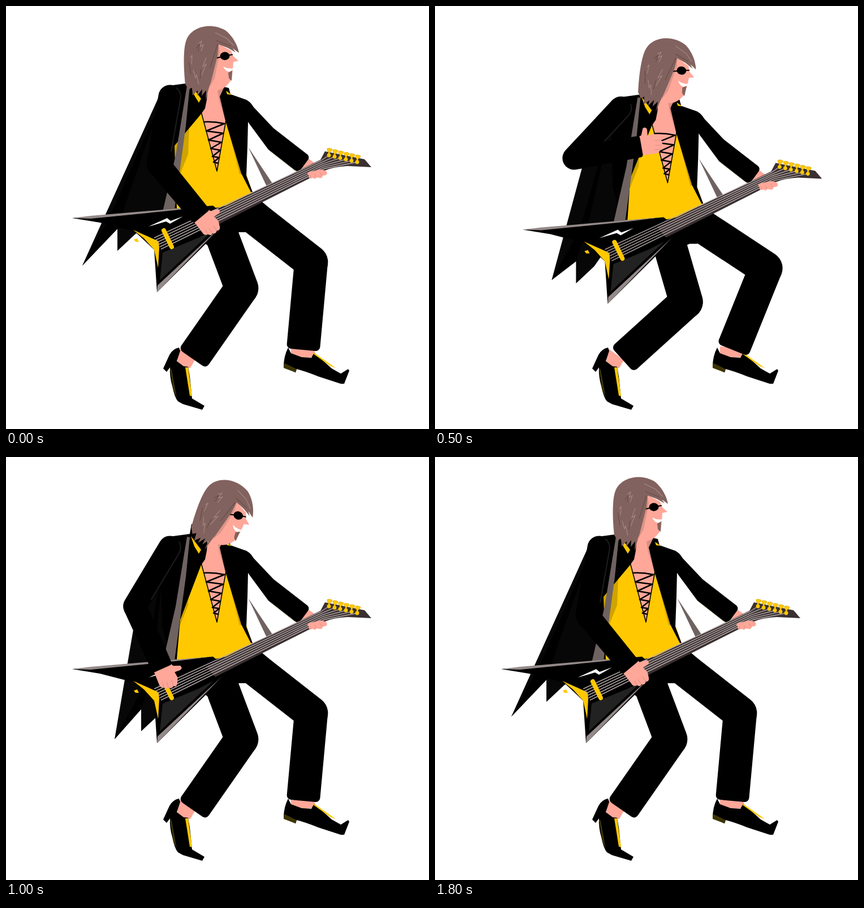
An HTML page that plays this animation: 748x748 px, repeating every 1820 ms.

```html
<!DOCTYPE html>
<html lang="en">
<head>
<meta charset="utf-8">
<title>Guitarist</title>
<style>
  html, body { margin: 0; width: 100%; height: 100%; overflow: hidden; background: #fff; }
  svg { display: block; width: 100vw; height: 100vh; }
  .skin { fill: #ffa799; }
  .gold { fill: #ffc800; }
  .olive { fill: #3c3404; }
  .strap { fill: #6f6361; }
  .bevel { fill: #958a8a; }
  .hair { fill: #82625e; }
  .wood { fill: #3a3031; }
  .line { fill: none; stroke: #000; stroke-linejoin: round; stroke-linecap: round; }
  .string { fill: none; stroke: #b3a7a7; stroke-width: 1.4; }
  .limb { stroke: #000; stroke-linecap: round; }
</style>
</head>
<body>
<svg viewBox="0 0 748 748">
  <g class="body">
    <path id="cape" fill="#070707"/>
    <path id="fold" fill="#000"/>
  </g>

  <g id="feet">
    <path class="skin" d="M304 604L334 626L326 640L316 640L303 630Z"/>
    <path d="M306 604Q295 606 289 617L278 641L284 647L290 639Q289 655 294 672Q298 692 304 699L313 704L347 714L351 707L329 694L325 655L322 638L314 637L302 628L308 610Z"/>
    <path class="gold" d="M317 639L322 639L329 690L325 689Z"/>
    <path class="olive" d="M290 641L293 643L302 693L296 679Z"/>
    <path class="skin" d="M504 602L548 605L543 621L526 622L504 615Z"/>
    <path d="M499 604Q491 619 491 638L512 648L514 642Q530 646 552 655L592 668H598L607 645L605 642L592 650L576 641L545 613L540 622L523 621L504 614Z"/>
    <path class="gold" d="M542 614L546 614L583 640L574 637Z"/>
    <path class="olive" d="M491 631L514 642L512 648L491 640Z"/>
  </g>

  <g class="body"><path d="M300 335H440L465 357L425 400L412 400L358 424L320 400Z"/></g>
  <g id="legs"></g>

  <g class="body">
    <path class="strap" d="M428 249L472 315L461 319Z"/>
    <path class="gold" d="M335 165L298 240L297 362L372 362L436 330L390 195Z"/>
    <path fill="#cfa300" d="M324 214L322 262L306 302L297 318V240Z"/>
    <path fill="#cfa300" d="M389 202L407 255L424 299L413 297Z"/>
    <path class="skin" d="M354 130H388L383 160L388 202L373 290L346 187Z"/>
    <path fill="#d78f83" d="M374 150L389 138L380 160L388 202L377 168Z"/>
    <path class="line" stroke-width="1.6" d="M345 187L373 292L389 202"/>
    <path class="line" stroke-width="2.5" d="M350 205Q368 204 386 208L354 221L384 225L358 237L381 241L362 252L379 255L365 266L377 268L367 276L375 278"/>
    <path id="panel"/>
    <path class="gold" d="M327 140L345 164L341 171L333 158Z"/>
    <path d="M386 143L394 145L397 156L425 166L437 178L428 205L427 247L425 300L436 329L433 329L416 296L388 203L378 160Z"/>
    <path class="gold" d="M389 150L399 157L391 156Z"/>
    <path class="skin" d="M535 270L552 282L538 298L522 286Z"/>
    <path d="M398 157L425 166Q432 169 438 179L473 216L531 261Q538 266 534 272L523 287Q517 295 510 290L464 254L430 208Z"/>
    <path fill="none" stroke="#3c3404" d="M466 255L511 290Q517 294 521 289"/>
    <path class="strap" d="M320 141L325 142L318 212L298 360L277 364L300 264Z"/>

    <g id="guitar">
      <path d="M117 375L366 353L371 357L395 352L382 392L267 506L262 431L228 399L166 383Z"/>
      <path class="bevel" d="M117 375L150 371L364 353L300 361L150 376Z"/>
      <path class="bevel" d="M267 506L268 494L381 389Z"/>
      <path fill="#222" d="M272 485L277 436L340 410L367 396Z"/>
      <path fill="#fff" d="M252 390L285 375L291 380L313 372L290 385L283 381Z"/>
      <path class="gold" d="M225 396L270 416L271 428L269 463L262 431L244 411Z"/>
      <path class="gold" d="M226 413L232 411L235 417L229 417Z"/>
      <path class="wood" d="M354 370L556 272L564 257L634 271L646 285L604 283Q580 284 564 291L370 389Z"/>
      <g id="strings"></g>
      <path stroke="#ffc800" stroke-width="8" stroke-linecap="round" d="M279 397L293 426"/>
      <g id="pegs"></g>
    </g>
    <path class="skin" d="M533 298Q533 294 538 293L556 289L565 291Q570 295 566 299L560 300Q560 305 554 304L549 303Q547 308 543 304L538 305Q534 304 536 300Z"/>
    <path fill="none" stroke="#d78f83" d="M549 303L546 297M559 300L555 294M539 304L538 299"/>

    <g id="head">
      <path class="skin" d="M374 66L398 79L402 89L411 97L402 99L401 113L399 130L391 140Q378 153 356 148L362 100Z"/>
      <path fill="#dc9489" d="M376 70L378 82L369 128L356 150L362 95Z"/>
      <path fill="#fff" d="M384 107Q393 112 402 110Q400 117 393 116Q387 114 384 107Z"/>
      <path class="hair" d="M393 118L400 114L399 132Q396 131 394 127Z"/>
      <path class="line" stroke-width="2" d="M372 92L381 90M394 87L400 86"/>
      <ellipse cx="387" cy="88.5" rx="8.5" ry="7.2"/>
      <path class="hair" d="M317 138C314 110 313 75 319 60C328 36 362 28 388 43C401 53 410 70 412 83L401 75L406 82L392 74L376 68L374 88L366 120L360 143L361 136L353 167L354 149L346 159L347 147L338 159L339 149L330 158L329 144L323 148Z"/>
      <path fill="none" stroke="#a58a83" stroke-width="1.1" d="M340 66L346 62L343 72L349 68L345 80M354 91L348 107L354 103L346 122M326 92L329 87L328 103M331 113L335 127L337 122L341 139M370 47L390 57L403 70"/>
      <path fill="none" stroke="#604944" stroke-width="1" d="M336 75L342 68L340 80M374 68L361 109M323 98L327 121M372 61L397 71M345 112L343 129"/>
    </g>

    <g id="upper">
      <path class="limb" stroke-width="41" d="M0 0H121"/>
      <path fill="none" stroke="#1d1d1d" stroke-width="2" d="M-17 -8Q-12 -19 2 -19H96"/>
    </g>
    <g id="fore">
      <path class="skin" d="M114 -15L124 -19L129 -31Q135 -33 136 -27L135 -17L146 -18L156 -13Q161 -9 157 -5Q161 0 156 4Q159 9 152 11Q151 18 144 17L116 16Z"/>
      <path fill="none" stroke="#d78f83" d="M157 -5L146 -6M156 4L145 3M152 11L143 10"/>
      <path d="M0 -20.5L116 -19Q121 -19 121 -14V14Q121 19 116 19L0 20.5Z"/>
    </g>
  </g>
</svg>

<script>
const LOOP = 1820;
const $ = id => document.getElementById(id);
const bodies = document.querySelectorAll('.body');

const make = (parent, tag, attrs) => {
  const el = document.createElementNS('http://www.w3.org/2000/svg', tag);
  for (const name in attrs) el.setAttribute(name, attrs[name]);
  return parent.appendChild(el);
};

// time, x, y
const bodyKeys = [[0, 0, 0], [300, 21, 50], [600, 44, 11], [1000, 0, 0]];
// time, degrees
const headKeys = [[0, 0], [300, 1.7], [500, 8.7], [840, 18], [1000, 21], [1800, 0]];
// time, upper arm, forearm, outer coat tip x y, inner coat tip x y, lapel
const poseKeys = [
  [0, 100, 50.5, 135, 459, 197, 433, 0],
  [300, 110, 58, 159, 393, 199, 436, 0],
  [500, 133, -10, 168, 464, 211, 470, .9],
  [840, 98, 88, 185, 498, 231, 486, 1],
  [1000, 121, 66, 192, 499, 239, 485, 1],
  [1320, 171.5, 64, 144, 472, 192, 458, .3],
  [1800, 100, 50.5, 135, 459, 197, 433, 0]
];

const linear = p => p;
const sine = p => (1 - Math.cos(Math.PI * p)) / 2;

function track(keys, t, ease) {
  const next = keys.findIndex(k => k[0] > t);
  if (next < 0) return keys[keys.length - 1].slice(1);
  const a = keys[next - 1], b = keys[next];
  const p = ease((t - a[0]) / (b[0] - a[0]));
  return a.slice(1).map((v, i) => v + (b[i + 1] - v) * p);
}

// Strings and tuning pegs
for (let i = 0; i < 6; i++) {
  const px = 571 + 10 * i, py = 264 + 2.4 * i;
  make($('strings'), 'path', {
    class: 'string',
    d: `M${262 + 2.4 * i} ${410 + 4 * i}L${556 + 1.4 * i} ${274 + 2.7 * i}L${px} ${py}`
  });
  make($('pegs'), 'path', {
    class: 'gold',
    d: `M${px - 3} ${py - 12}q4 -2 9 1q0 4 -4 5l-1 4h-2v-4q-3 -2 -2 -6Z`,
    stroke: '#a88400', 'stroke-width': .4
  });
  make($('pegs'), 'circle', { class: 'gold', cx: px, cy: py, r: 3.4 });
}

// Legs: fixed ankles, hips that follow the body
function makeLeg(hip, ankle, thighLen, shinLen, hem) {
  const thigh = make($('legs'), 'line', { class: 'limb', 'stroke-width': 59.5 });
  const shin = make($('legs'), 'rect', { x: -8, y: -29.5, width: hem + 8, height: 59, rx: 8 });
  return (bx, by) => {
    const hx = hip[0] + bx, hy = hip[1] + by;
    const dx = ankle[0] - hx, dy = ankle[1] - hy, d = Math.hypot(dx, dy);
    const along = (thighLen ** 2 - shinLen ** 2 + d * d) / (2 * d);
    const out = Math.sqrt(Math.max(0, thighLen ** 2 - along ** 2));
    const kx = hx + (dx * along + dy * out) / d;
    const ky = hy + (dy * along - dx * out) / d;
    const angle = Math.atan2(ankle[1] - ky, ankle[0] - kx) * 180 / Math.PI;
    for (const [name, v] of [['x1', hx], ['y1', hy], ['x2', kx], ['y2', ky]]) thigh.setAttribute(name, v);
    shin.setAttribute('transform', `translate(${kx} ${ky}) rotate(${angle})`);
  };
}
const legs = [
  makeLeg([365, 362], [324, 632], 146.5, 162, 152),
  makeLeg([425, 363], [525, 612], 145.5, 160, 156)
];

function draw(t) {
  const [bx, by] = track(bodyKeys, t, sine);
  bodies.forEach(g => g.setAttribute('transform', `translate(${bx} ${by})`));
  legs.forEach(pose => pose(bx, by));

  const [tilt] = track(headKeys, t, linear);
  $('head').setAttribute('transform', `rotate(${tilt} 358.5 160)`);

  const [a, b, x1, y1, x2, y2, lapel] = track(poseKeys, t, sine);
  const rad = a * Math.PI / 180;
  const ex = 290 + 121 * Math.cos(rad), ey = 160 + 121 * Math.sin(rad);
  $('upper').setAttribute('transform', `translate(290 160) rotate(${a})`);
  $('fore').setAttribute('transform', `translate(${ex} ${ey}) rotate(${b})`);

  // The coat's back edge bends outwards as the lapel swings down
  const bendX = 275 + (x1 - 275) * 96 / (y1 - 150) - 17 * lapel;
  const tails = `L${x2} ${y2 - 39}L${x2} ${y2}L${x2 + 32} ${y2 - 30}`;
  $('cape').setAttribute('d', `M275 150L${bendX} 246L${x1} ${y1}${tails}L298 362L310 150Z`);
  $('fold').setAttribute('d',
    `M282 150L${x1 + 50} ${y1 - 90}L${x1} ${y1}L${x2} ${y2 - 39}L${x2 + 20} ${y2 - 100}Z`);
  $('panel').setAttribute('d',
    `M328 118L338 134L357 138L355 166L352 181L345 191L${298 + 10 * lapel} ${247 + 41 * lapel}L302 358H292L276 300L272 150L288 141L325 136Z`);
}

function tick() {
  draw(performance.now() % LOOP);
  requestAnimationFrame(tick);
}
tick();
</script>
</body>
</html>
```
